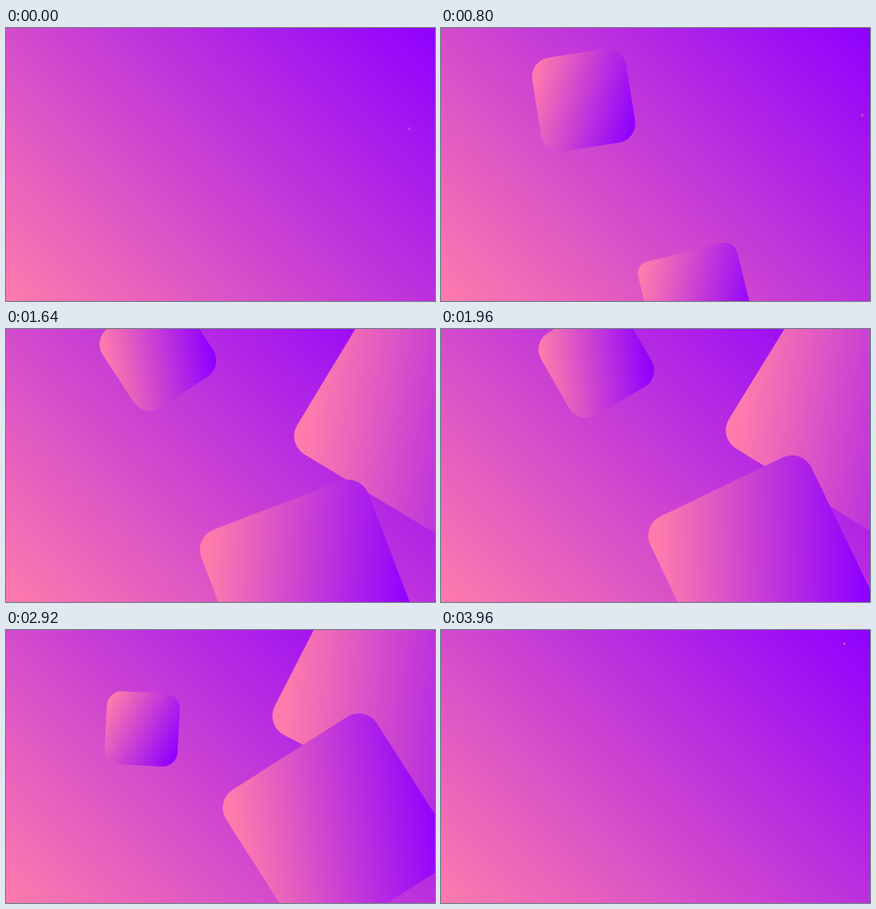
An HTML page with a canvas for the animation above (4000 ms loop, 600x382 px).

```html
<!DOCTYPE html>
<html lang="en">
<head>
<meta charset="utf-8">
<title>Floating squares</title>
<style>
  html, body { margin: 0; width: 100%; height: 100%; overflow: hidden; }
  canvas { display: block; }
</style>
</head>
<body>
<canvas id="stage" width="600" height="382"></canvas>
<script>
const LOOP = 4000, STEP = 40;
const POSE_GAP = 800;   // time between two poses of a path
const SCALE_TIME = 640; // time to grow or shrink
const PINK = '#ff7bac', VIOLET = '#8f00ff';
const ctx = document.getElementById('stage').getContext('2d');

// Painted back to front; each pose is [x, y, degrees].
const squares = [
  {
    size: 300, dot: 3.5, radius: 30, lean: -24, grow: 800, shrink: 3250,
    path: [[565, 141, 15], [590, 122, 24], [598, 110, 31], [583, 90, 30.5], [557, 55, 24.5], [565, 18, 15]]
  },
  {
    size: 250, dot: 0, radius: 30, lean: 24, grow: 450, shrink: 3170,
    path: [[300, 390, -6], [358, 383, -14], [421, 366, -20.5], [468, 293, -31.5], [454, 279, -32], [400, 315, -29]]
  },
  {
    size: 133, dot: 0, radius: 27, lean: 24, grow: 0, shrink: 2720,
    path: [[217, 72, 0], [199.5, 101, -9], [212, 33, -33], [217, 78, -18], [178, 163.5, 12]]
  }
];

function ease(p) {
  p = Math.min(1, Math.max(0, p));
  return p * p * (3 - 2 * p);
}

function spline(a, b, c, d, p) {
  const q = 1 - p, startPull = (c - a) / 2, endPull = (d - b) / 2;
  return q * q * ((1 + 2 * p) * b + p * startPull) +
         p * p * ((1 + 2 * q) * c - q * endPull);
}

function poseAt(path, t) {
  const step = Math.floor(t / POSE_GAP), p = t / POSE_GAP - step;
  const pose = i => path[Math.min(path.length - 1, Math.max(0, i))];
  const [a, b, c, d] = [-1, 0, 1, 2].map(i => pose(step + i));
  return b.map((_, k) => spline(a[k], b[k], c[k], d[k], p));
}

function gradient(x0, y0, x1, y1) {
  const fill = ctx.createLinearGradient(x0, y0, x1, y1);
  fill.addColorStop(0, PINK);
  fill.addColorStop(1, VIOLET);
  return fill;
}

const radians = degrees => degrees * Math.PI / 180;

// Runs at 45 degrees through the middle of the stage.
const backdrop = gradient(54.5, 436.5, 545.5, -54.5);

function drawSquare({ size, dot, radius, lean, grow, shrink, path }, t) {
  const scale = ease((t - grow) / SCALE_TIME) * (1 - ease((t - shrink) / SCALE_TIME));
  const side = Math.max(dot, size * scale), half = side / 2;
  if (side < 0.1) return;
  const [x, y, turn] = poseAt(path, t);
  const dx = Math.cos(radians(lean)) * half * 1.15;
  const dy = Math.sin(radians(lean)) * half * 1.15;
  ctx.save();
  ctx.translate(x, y);
  ctx.rotate(radians(turn));
  ctx.fillStyle = gradient(-dx, -dy, dx, dy);
  ctx.beginPath();
  ctx.roundRect(-half, -half, side, side, radius * side / size);
  ctx.fill();
  ctx.restore();
}

const start = performance.now();

function frame() {
  const elapsed = Math.max(0, performance.now() - start) % LOOP;
  const t = Math.floor(elapsed / STEP) * STEP;
  ctx.fillStyle = backdrop;
  ctx.fillRect(0, 0, 600, 382);
  for (const square of squares) drawSquare(square, t);
  requestAnimationFrame(frame);
}
frame();
</script>
</body>
</html>
```
